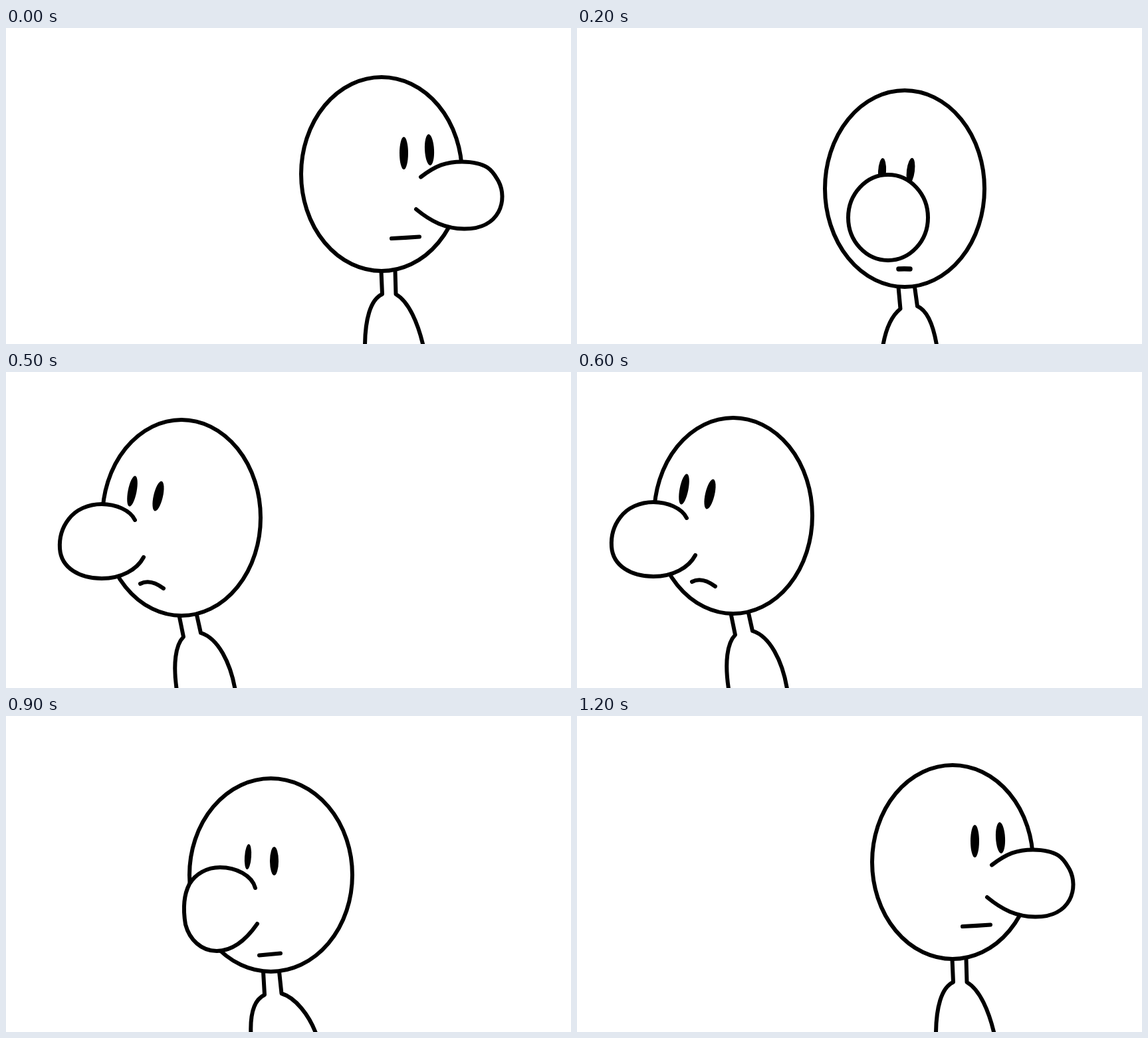
An HTML page with a canvas for the animation above (1.3 s loop, 850 by 476 pixels).

```html
<!DOCTYPE html>
<html lang="en">
<head>
<meta charset="utf-8">
<title>Head turn</title>
<style>
html, body { margin: 0; width: 100%; height: 100%; overflow: hidden; background: #fff; }
canvas { display: block; }
</style>
</head>
<body>
<canvas id="stage" width="850" height="476"></canvas>
<script>
const ctx = document.getElementById('stage').getContext('2d');
const STEP = 100, LOOP = 1300;

// Ovals are "cx cy rx ry degrees"; all other parts are paths.
const right = {
  body: 'M564.5 366L566 401C548 409 540 440 540 480M585.5 366L586.5 401C606 412 620 445 628 480',
  head: '565 220 121 146 0',
  eyeL: '598.5 188.5 6.5 24.5 0',
  eyeR: '637 183.5 7 23.5 -3',
  nose: 'M624 224.5C647 207 662 201.5 686 201.5C728 202 733 218 741 231C755 258 744 303 689 302.5C661 302 640 292 617 273',
  mouth: 'M580 317Q601 316 622 314.5',
  lip: '6'
};
const front = {
  body: 'M483.5 390L486.5 423C474 433 465 450 460 480M508 390L512 419C526 425 536 446 541.5 480',
  head: '493 242 120 148 0',
  eyeL: '459 216 6 20 3',
  eyeR: '502 215 6 19.5 7',
  nose: 'M408 285.5C408 250 435 221 468 221C501 221 528 250 528 285.5C528 321 501 350 468 350C435 350 408 321 408 285.5',
  mouth: 'M484 363Q492 362.5 501 363',
  lip: '7.5'
};
const halfLeft = {
  body: 'M387 385L389 420C374 427 367 448 368.5 480M411 385L414.5 418C435 424 456 450 467 480',
  head: '398.5 239.5 122.5 145.5 0',
  eyeL: '364 212 5 19 4',
  eyeR: '403.5 218.5 6.5 21.5 0',
  nose: 'M375 259C370 240 346 228 322 228C302 228 285 238 276 253C266 272 267 296 270 314C276 337 294 354 317 354C342 354 362 336 378 313',
  mouth: 'M381 360.5Q397 359 413 357.5',
  lip: '6'
};
const left = {
  body: 'M260.5 367L267 399C255 411 251 440 257 480M287 366L293 393C319 401 338 438 345 480',
  head: '264 219.5 119 147.5 0',
  eyeL: '190 179.5 6.5 23.5 11',
  eyeR: '229 187 7 23 13',
  nose: 'M194 223C187 208 165 199 144 199C124 199 105 207 94 222C84 235 80 250 81 266C83 296 112 311 144 311C173 311 197 298 207 279',
  mouth: 'M202 319Q217 311 237 326',
  lip: '6'
};

const NUMBER = /-?[\d.]+/g;

function mix(a, b, t) {
  const pose = {};
  for (const part in a) {
    const ends = b[part].match(NUMBER);
    let i = 0;
    pose[part] = a[part].replace(NUMBER, n => +n + (ends[i++] - n) * t);
  }
  return pose;
}

const leanLeft = { ...left, shift: [-29, -3] };
const poses = [right, mix(right, front, 0.4), front, halfLeft, mix(halfLeft, left, 0.7), left, leanLeft];

function oval(spec) {
  const [x, y, rx, ry, deg] = spec.split(' ').map(Number);
  const path = new Path2D();
  path.ellipse(x, y, rx, ry, deg * Math.PI / 180, 0, 2 * Math.PI);
  return path;
}

function outline(path, filled = true) {
  ctx.fillStyle = '#fff';
  if (filled) ctx.fill(path);
  ctx.stroke(path);
}

function draw(pose) {
  ctx.setTransform(1, 0, 0, 1, 0, 0);
  ctx.fillStyle = '#fff';
  ctx.fillRect(0, 0, 850, 476);
  ctx.translate(...(pose.shift || [0, 0]));
  ctx.strokeStyle = '#000';
  ctx.lineCap = ctx.lineJoin = 'round';
  ctx.lineWidth = 6;
  outline(new Path2D(pose.body), false);
  outline(oval(pose.head));
  ctx.fillStyle = '#000';
  ctx.fill(oval(pose.eyeL));
  ctx.fill(oval(pose.eyeR));
  outline(new Path2D(pose.nose));
  ctx.lineWidth = +pose.lip;
  outline(new Path2D(pose.mouth), false);
}

// Turn left through the poses, then back again.
function tick() {
  const step = Math.floor(performance.now() % LOOP / STEP);
  draw(poses[6 - Math.abs(6 - step)]);
  requestAnimationFrame(tick);
}
tick();
</script>
</body>
</html>
```
